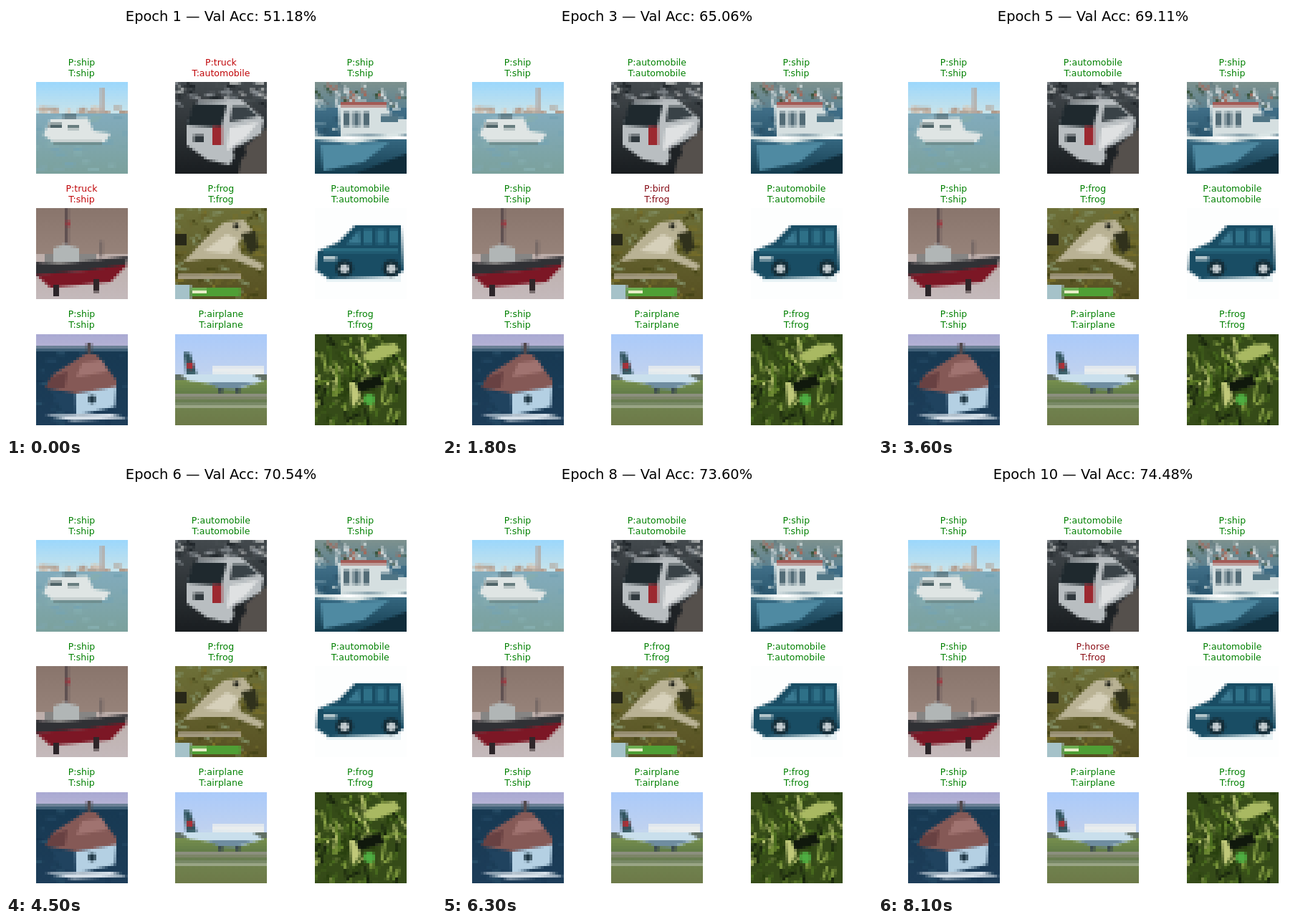
Animation, 600 px wide and 600 px high, one loop 9000 ms. Source, as an HTML page with a canvas:

```html
<!DOCTYPE html>
<html lang="en">
<head>
<meta charset="utf-8">
<title>Validation predictions by epoch</title>
<style>
  html, body { margin: 0; width: 100%; height: 100%; overflow: hidden; background: #fff; }
  canvas, svg { position: absolute; left: 0; top: 0; width: 600px; height: 600px; }
  text { font-family: "DejaVu Sans", sans-serif; text-anchor: middle; font-size: 12.5px; }
  #title { font-size: 19.44px; }
</style>
</head>
<body>
<canvas id="photos" width="600" height="600"></canvas>
<svg id="labels" viewBox="0 0 600 600"><text id="title" x="300" y="21"></text></svg>
<script>
const STEP = 900;
const GRID = 32;
const GREEN = '#008000';
const accuracy = ['51.18', '60.24', '65.06', '67.06', '69.11', '70.54', '72.92', '73.60', '74.38', '74.48'];
const truth = ['ship', 'automobile', 'ship', 'ship', 'frog', 'automobile', 'ship', 'airplane', 'frog'];
// Wrong guesses per epoch: cell -> [prediction, colour]
const misses = {
  1: { 1: ['truck', '#c00508'], 3: ['truck', '#c00508'] },
  3: { 4: ['bird', '#850a14'] },
  7: { 4: ['bird', '#850a14'] },
  10: { 4: ['horse', '#8a0c14'] }
};

// Small painting kit; every photo is painted on a 32 x 32 grid.
let ctx, seed;
const random = () => (seed = (seed * 16807) % 2147483647) / 2147483647;

function box(colour, x, y, w, h) {
  ctx.fillStyle = colour;
  ctx.fillRect(x, y, w, h);
}

function disc(colour, x, y, r) {
  ctx.fillStyle = colour;
  ctx.beginPath();
  ctx.arc(x, y, r, 0, 2 * Math.PI);
  ctx.fill();
}

function shape(colour, ...points) {
  ctx.fillStyle = colour;
  ctx.beginPath();
  for (let i = 0; i < points.length; i += 2) ctx.lineTo(points[i], points[i + 1]);
  ctx.fill();
}

function fade(top, bottom, y0, y1) {
  const fill = ctx.createLinearGradient(0, y0, 0, y1);
  fill.addColorStop(0, top);
  fill.addColorStop(1, bottom);
  box(fill, 0, y0, GRID, y1 - y0);
}

// Random short strokes between two heights, around one direction
function scatter(tones, count, y0, y1, angle = 0, spread = 0, length = 3) {
  for (let i = 0; i < count; i++) {
    const x = random() * GRID - length / 2, y = y0 + random() * (y1 - y0);
    const a = angle + (random() - 0.5) * spread;
    const l = length * (0.4 + random());
    ctx.strokeStyle = tones[i % tones.length];
    ctx.lineWidth = 1;
    ctx.beginPath();
    ctx.moveTo(x, y);
    ctx.lineTo(x + Math.cos(a) * l, y + Math.sin(a) * l);
    ctx.stroke();
  }
}

const photos = [
  function yacht() {
    fade('#9bd7fc', '#c9e3e9', 0, 11);
    scatter(['#c3b3a5', '#b09a8a', '#d3c8bc'], 26, 9, 11);
    box('#b4aaa4', 22.4, 2, 1.4, 9);
    fade('#82abbd', '#7ba19c', 11, GRID);
    scatter(['#76a4b3', '#86aeb0', '#7da5ab'], 36, 12, GRID);
    shape('#dfe5e4', 2.5, 18.5, 5, 13, 18, 12.5, 20, 17, 26, 18, 24, 21, 6, 21);
    box('#43575d', 9.5, 11.5, 4.5, 1);
    box('#4e6367', 4.5, 14.5, 4.5, 1.5);
    box('#687e80', 11, 15, 4, 1.3);
    box('#688180', 6, 20.8, 17, 0.8);
  },
  function estateCar() {
    fade('#43494d', '#191d20', 0, GRID);
    scatter(['#858b90', '#20262a', '#b4b7b7', '#4a5155'], 40, 0, 7, 0.2, 1);
    shape('#55504c', 22, GRID, 24, 23, GRID, 16, GRID, GRID);
    shape('#b9bec1', 4, 15, 8, 6.5, 23, 6, 31, 13, 30, 18, 23, 22, 19, 29, 11, 27, 4, 22);
    shape('#1f292e', 4, 15, 6.5, 7.5, 18, 8, 16, 16);
    shape('#394247', 20, 8.5, 25, 8.5, 29, 12, 19, 14);
    shape('#dfe1e2', 19, 16, 29, 14, 25, 19, 18, 24);
    box('#30383d', 6.5, 18.5, 3.5, 2.5);
    box('#9c2930', 13, 15.5, 3.3, 6.5);
    disc('#1e2225', 22.5, 24.5, 2.3);
  },
  function fishingBoat() {
    fade('#7d918e', '#5d8290', 0, 9);
    scatter(['#344f35', '#d2dadd', '#a76959', '#62787f', '#ccd6d6'], 50, 0, 9, 1, 1);
    fade('#416f88', '#2a566e', 9, 19);
    scatter(['#284d63', '#5f8799', '#a6bac0'], 24, 9, 18);
    shape('#d5dfe0', 8, 8, 25, 8, 27, 13, GRID, 13, GRID, 18, 9, 19);
    box('#a35a55', 9, 7, 16, 1.5);
    for (let x = 10; x < 20; x += 3.4) box('#526b76', x, 10.5, 2.2, 5);
    box('#507585', 23, 11.5, 6, 2.5);
    fade('#356780', '#153d50', 20, GRID);
    shape('#4f8aa2', 2, 22, 26, 21, 17, 28, 3, 31);
    shape('#dae5e5', 0, 18.5, 12, 20, GRID, 17, GRID, 18.5, 13, 21.5, 0, 20);
    shape('#102c3a', 14, GRID, 24, 28, GRID, 25, GRID, GRID);
  },
  function redHull() {
    fade('#89756c', '#97837a', 0, 17);
    fade('#bdaeaa', '#c4b9bb', 16, GRID);
    box('#55474a', 10.2, 0, 1, 15);
    box('#a52c38', 10.5, 4.5, 1.2, 1.8);
    box('#655b5c', 22.4, 11.5, 0.8, 6);
    box('#868584', 3, 16, 18, 4);
    shape('#b1b6b6', 6, 14, 10, 12.5, 15, 14, 15, 19, 6, 19);
    shape('#303135', 0, 19, 8, 20, GRID, 17, 31, 21, 0, 24);
    shape('#7c1725', 0, 23.5, 18, 22, GRID, 19.7, 26, 26, 5, 28);
    box('#2c2529', 6, 27, 2, 4);
    box('#302629', 20, 25, 2, 4.5);
  },
  function paleFrog() {
    fade('#6d7038', '#575022', 0, GRID);
    scatter(['#454517', '#7a7029', '#686229', '#829066'], 90, 0, GRID, 0.4, 2);
    box('#282819', 0, 9, 4, 4);
    shape('#b9b294', 3, 19, 10, 11, 17, 5, 24, 4, 27, 8, 22, 12, 23, 16, 31, 20, 30, 22, 20, 18, 10, 18);
    shape('#d6d0ba', 10, 15, 18, 9, 22, 11, 19, 16);
    disc('#292a20', 21.3, 6.2, 1);
    shape('#30311c', 23, 9, 28, 8, 29, 14, 26, 16);
    box('#a39a80', 1, 23.2, 22, 1.8);
    box('#a5c2c9', 0, 27, 5.5, 5);
    box('#4f9f35', 5.5, 28, 17.3, 3);
    box('#e6edc6', 6, 28.8, 5, 1.2);
  },
  function tealCar() {
    box('#fdfefe', 0, 0, GRID, GRID);
    box('#e8f2f5', 4, 24, 26, 2);
    shape('#194d64', 0.5, 22, 1, 15, 8, 12, 14, 6, 30, 6, 31, 22, 28, 24, 5, 25);
    shape('#3a7a92', 11, 12.5, 15.5, 7.5, 16, 12.5);
    for (let x = 17; x < 29; x += 4.5) box('#2e7087', x, 7.5, 3, 5);
    box('#28697f', 3, 14, 26, 1.5);
    box('#b3c6cb', 3, 17, 4.5, 1.5);
    for (const x of [10.3, 26.7]) {
      disc('#142d38', x, 21.3, 3);
      disc('#c3ccd0', x, 21.3, 1.6);
    }
  },
  function redRoofShip() {
    fade('#a9a9d2', '#b4b2d4', 0, 4);
    fade('#8291a5', '#284f68', 4, 6);
    fade('#173952', '#1d3d59', 6, GRID);
    scatter(['#284f68', '#173550', '#234863'], 40, 6, GRID);
    box('#52494d', 17.7, 3, 1.6, 6);
    shape('#855956', 17, 7, 21, 7, 28, 16, 28, 19, 14, 21, 3.5, 19, 6, 14);
    shape('#a07370', 16, 10, 23, 9, 25, 13, 14, 15);
    shape('#684142', 5, 15, 11, 13, 10, 19, 3.5, 19);
    shape('#20435f', 5, 20, 14, 21, 14, 28.5, 9, 27);
    shape('#b4d0e3', 13.8, 21, 28, 18.5, 27.5, 25.5, 14, 28.5);
    disc('#203846', 19.5, 23, 1.4);
    shape('#d6e0e9', 3, 28.5, 26, 28, GRID, 29.5, 13, 30.5);
  },
  function airliner() {
    fade('#aacafa', '#c1d2ee', 0, 14);
    box('#e9edee', 13, 11.2, 18, 4);
    box('#606f64', 0, 14, GRID, 2);
    fade('#78904e', '#627c48', 16, 21);
    fade('#939489', '#75805c', 21, 23);
    fade('#627848', '#88947a', 23, 25.5);
    fade('#70824e', '#6d7948', 25.5, GRID);
    shape('#31545f', 3, 6.2, 5.2, 6.5, 8, 15, 4, 15);
    disc('#ac3038', 5.2, 11, 1.2);
    shape('#c9dfec', 2, 14, 13, 13.8, 27, 14, 31, 16.5, 23, 19, 5, 16.5);
    shape('#6f8da0', 11, 17, 28, 17, 21, 19.5, 15, 19);
    for (const x of [15, 21]) box('#3c4b50', x, 19, 1.6, 1.8);
  },
  function foliage() {
    box('#354b18', 0, 0, GRID, GRID);
    const tones = ['#17240d', '#496b1e', '#29400f', '#87a044', '#66852c', '#b0bd69'];
    scatter(tones, 70, 0, 16, 0.9, 1.5, 5);
    scatter(tones, 70, 14, GRID, 2.1, 1.5, 5);
    shape('#a9b962', 16, 8, 22, 4, 28, 3, 30, 6, 20, 10);
    shape('#10180c', 15, 17, 23, 14, 24, 18, 14, 21);
    shape('#c0c879', 12, 17, 14, 17, 16, 22, 13, 26);
    disc('#4eae42', 19, 23, 2);
  }
];

function paintPhotos() {
  const stage = document.getElementById('photos').getContext('2d');
  stage.imageSmoothingEnabled = false;
  photos.forEach((paint, i) => {
    const tile = document.createElement('canvas');
    tile.width = tile.height = GRID;
    ctx = tile.getContext('2d');
    seed = 83 + i;
    paint();
    const row = Math.floor(i / 3);
    stage.drawImage(tile, Math.round(41.8 + (i % 3) * 194.5), 106 + row * 176, 128, row ? 127 : 128);
  });
}

function addText(x, y) {
  const node = document.createElementNS('http://www.w3.org/2000/svg', 'text');
  node.setAttribute('x', x);
  node.setAttribute('y', y);
  document.getElementById('labels').append(node);
  return node;
}

const title = document.getElementById('title');
const captions = truth.map((_, i) => {
  const x = 105.5 + (i % 3) * 194.4;
  const y = Math.round(98 + Math.floor(i / 3) * 175.6);
  return [addText(x, y - 15), addText(x, y)];
});

let shown = -1;
function update() {
  const step = Math.floor(performance.now() / STEP) % accuracy.length;
  if (step !== shown) {
    shown = step;
    const epoch = step + 1;
    title.textContent = `Epoch ${epoch} — Val Acc: ${accuracy[step]}%`;
    captions.forEach(([guess, actual], i) => {
      const [name, colour] = misses[epoch]?.[i] ?? [truth[i], GREEN];
      guess.textContent = 'P:' + name;
      actual.textContent = 'T:' + truth[i];
      guess.style.fill = actual.style.fill = colour;
    });
  }
  requestAnimationFrame(update);
}

paintPhotos();
update();
</script>
</body>
</html>
```
